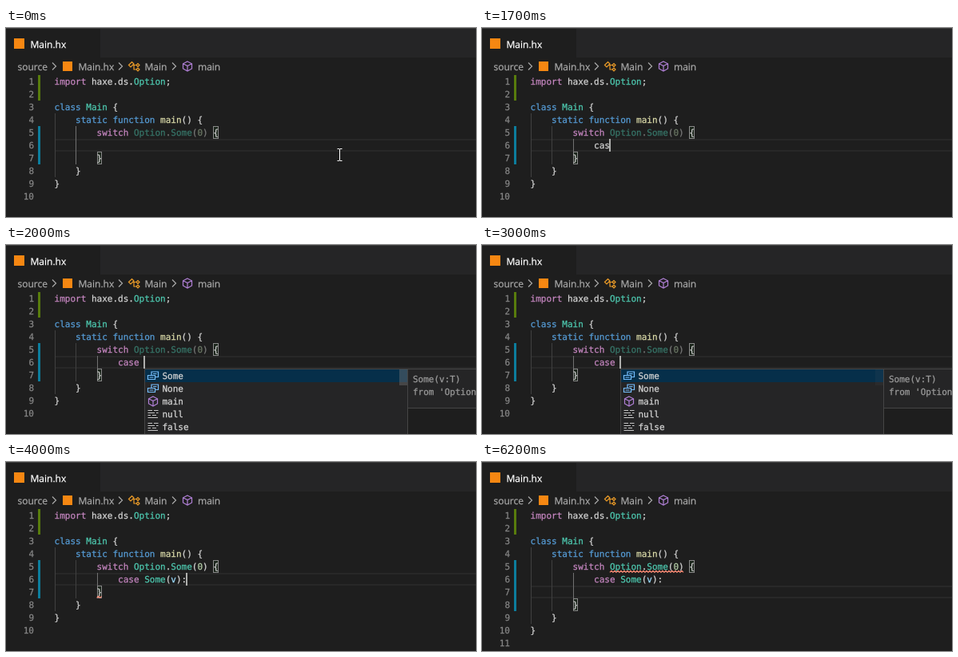
Write an HTML page that moves like this. It is 588 px wide and 237 px high and loops after 9.3 s.

```html
<!DOCTYPE html>
<html lang="en">
<head>
<meta charset="utf-8">
<title>Switch completion</title>
<style>
  html, body { margin: 0; width: 100%; height: 100%; overflow: hidden; background: #1e1e1e; }
  svg { display: block; width: 588px; height: 237px; }
  text { white-space: pre; text-rendering: geometricPrecision; stroke-width: .25px; }
  .mono { font: 11px "DejaVu Sans Mono", monospace; }
  .ui { font: 12px "Open Sans", sans-serif; }
</style>
</head>
<body>
<svg id="stage" viewBox="0 0 588 237"></svg>
<script>
const LOOP = 9300;
const CHAR = 6.6226, LEFT = 60.6, TOP = 59, LINE = 16;
const C = {
  text: '#d4d4d4', flow: '#c586c0', word: '#569cd6', type: '#4ec9b0', func: '#dcdcaa',
  name: '#9cdcfe', num: '#b5cea8', dim: '#858585', match: '#18a3ff', error: '#f48771',
  orange: '#ee9d28', blue: '#75beff', purple: '#b180d7', light: '#c5c5c5', crumb: '#a9a9a9',
  logo: '#f68712', panel: '#252526', edge: '#454545'
};

// Each step changes only the listed parts of the state.
const STEPS = [
  [0, { typed: '', caret: 0, mouse: [417.5, 159] }],
  [100, { mouse: [409, 153] }],
  [200, { mouse: [403.5, 150] }],
  [600, { mouse: [440, 149], caret: 1 }],
  [700, { mouse: [501.5, 146] }],
  [800, { mouse: null }],
  [1100, { caret: 0 }],
  [1500, { typed: 'c', caret: 1 }],
  [1700, { typed: 'cas' }],
  [1800, { typed: 'case', popup: 'types', scrollbar: 1 }],
  [1900, { typed: 'case ', popup: null }],
  [2000, { popup: 'values' }],
  [2300, { caret: 0 }],
  [2600, { scrollbar: .8 }],
  [2700, { scrollbar: .65 }],
  [2800, { scrollbar: .5, caret: 1 }],
  [2900, { scrollbar: .35 }],
  [3000, { scrollbar: .2 }],
  [3100, { typed: 'case Some(v):', popup: null, select: 1, column: 11 }],
  [3200, { hint: 1, live: 1, braceError: 1 }],
  [3600, { caret: 0 }],
  [3800, { hint: 0, select: 0, column: 13, caret: 1 }],
  [4300, { caret: 0, braceError: 0, switchError: 1 }],
  [4800, { newline: 1, caret: 1 }],
  [5300, { caret: 0 }],
  [5700, { caret: 1 }],
  [6200, { caret: 0 }]
];

const POPUPS = {
  types: {
    x: 167,
    rows: [
      ['struct', '*Case* - haxe.macro.Expr.Case'],
      ['enum', '*Case*First - js.lib.intl.Collator.CaseFirst'],
      ['class', '*Ca*nva*sE*lement - js.html.CanvasElement'],
      ['class', '*Ca*ch*eS*torage - js.html.CacheStorage'],
      ['enum', '*Ca*ch*eS*torageNamespace - js.html.CacheStorag…']
    ],
    info: ['typedef Case', 'Auto-import from'], doc: 'Represents a switch', height: 84
  },
  values: {
    x: 173,
    rows: [['member', 'Some'], ['member', 'None'], ['method', 'main'], ['keyword', 'null'], ['keyword', 'false']],
    info: ['Some(v:T)', "from 'Option'"], height: 50
  }
};

const colX = col => LEFT + col * CHAR;
const lineY = n => TOP + (n - 1) * LINE;
const esc = s => s.replace(/&/g, '&amp;').replace(/</g, '&lt;');
const ink = color => `fill="${color}" stroke="${color}"`;
const rect = (x, y, w, h, fill, extra = '') =>
  `<rect x="${x}" y="${y}" width="${w}" height="${h}" fill="${fill}" ${extra}/>`;
const box = (x, y, w, h, fill, stroke) => rect(x + .5, y + .5, w - 1, h - 1, fill, `stroke="${stroke}"`);
const path = (d, stroke, extra = '') => `<path d="${d}" fill="none" stroke="${stroke}" ${extra}/>`;
const text = (x, y, body, color, cls = 'mono', extra = '') =>
  `<text x="${x}" y="${y}" ${ink(color)} class="${cls}" ${extra}>${body}</text>`;
const span = (s, color, extra = '') => `<tspan ${ink(color)} ${extra}>${esc(s)}</tspan>`;

// Parts alternate between a palette key and the text it colours.
function code(line, col, ...parts) {
  let body = '';
  for (let i = 0; i < parts.length; i += 2) body += span(parts[i + 1], C[parts[i]]);
  return text(colX(col), lineY(line) + 12, body, C.text);
}

const ICONS = {
  method: [C.purple, 'M0-6L5.5-3.2V3L0 6L-5.5 3V-3.2ZM-5.5-3.2L0-.4L5.5-3.2M0-.4V6'],
  class: [C.orange, 'M-6.5-1.5L-2.5-5.5L0-3L-4 1ZM-2-1.5H3M0-1.5V4H3M3-1.5L5-3.5L7-1.5L5 .5ZM3 4L5 2L7 4L5 6Z'],
  enum: [C.orange, 'M-2 0V-5H6.5V1.5H3M0-2.7H4.5M-6.5 0H2.5V5.5H-6.5ZM-4.5 2H.5M-4.5 3.8H.5'],
  member: [C.blue, 'M-2-1V-5H6.5V1.5H3M0-2.5H4.5M-6.5-.5H2.5V4.5H-6.5ZM-4.5 2H.5'],
  keyword: [C.light, 'M-6.5-4.5H-1M1-4.5H6.5M-6.5-1.5H2M4-1.5H6.5M-6.5 1.5H-3M-1 1.5H4M-6.5 4.5H6'],
  struct: [C.light, 'M-6.5-5H6.5V-2H-6.5ZM-6.5 1H-2V5H-6.5ZM2 1H6.5V5H2Z']
};
const icon = (kind, x, y) =>
  path(ICONS[kind][1], ICONS[kind][0], `stroke-width="1.2" transform="translate(${x} ${y})"`);

function squiggle(x, bottom, width) {
  let d = `M${x} ${bottom - .7}`;
  for (let i = 0; i + 2 <= width; i += 2) d += `l2 ${i % 4 ? 2 : -2}`;
  return path(d, C.error, 'stroke-width="1.2"');
}

function header() {
  const chevron = x => path(`M${x} 43.5l4.5 4.5l-4.5 4.5`, C.crumb, 'stroke-width="1.2"');
  const crumb = (x, s) => text(x, 53, s, C.crumb, 'ui');
  return rect(118, 0, 470, 37, C.panel) + rect(0, 0, 588, 1, '#3c3c3c') +
    rect(10, 13, 13, 13, C.logo) + text(30.5, 25, 'Main.hx', '#fff', 'ui') +
    crumb(14.5, 'source') + chevron(58) +
    rect(71, 42, 12, 12, C.logo) + crumb(90.5, 'Main.hx') + chevron(141) +
    icon('class', 160, 48) + crumb(173.5, 'Main') + chevron(208) +
    icon('method', 227, 48) + crumb(240, 'main');
}

function gutter(s) {
  let out = rect(40, lineY(1), 3, 2 * LINE, '#587c0c') +
    rect(40, lineY(5), 3, (s.newline ? 4 : 3) * LINE, '#0c7d9d');
  for (let n = 1; n <= (s.newline ? 11 : 10); n++)
    out += text(35, lineY(n) + 12, n, C.dim, 'mono', 'text-anchor="end"');
  return out;
}

function guides(s) {
  const extra = s.newline ? 1 : 0;
  const guide = (col, line, count, active) =>
    rect(Math.round(colX(col)), lineY(line), 1, count * LINE, active ? '#707070' : '#404040');
  return guide(0, 4, 5 + extra) + guide(4, 5, 3 + extra, !s.typed) +
    (s.typed ? guide(8, 6, 1 + extra, true) : '');
}

function typedLine(s) {
  if (!s.typed.startsWith('case')) return code(6, 12, 'text', s.typed);
  if (s.typed.length < 6) return code(6, 12, 'flow', s.typed);
  return code(6, 12, 'flow', 'case ', 'type', 'Some', 'text', '(', 'name', 'v', 'text', '):');
}

function bracket(col, line) {
  const x = Math.round(colX(col));
  return box(x, lineY(line), Math.round(colX(col + 1)) - x, LINE, 'rgba(0,100,0,.1)', '#888');
}

function source(s) {
  const close = s.newline ? 8 : 7;
  const value = code(5, 15, 'type', 'Option', 'text', '.', 'type', 'Some', 'text', '(', 'num', '0', 'text', ')');
  return (s.select ? rect(colX(22), lineY(6), CHAR, LINE, '#264f78') + rect(226, lineY(6), 1, LINE, '#7c7c7c')
      : bracket(30, 5) + bracket(8, close)) +
    code(1, 0, 'flow', 'import ', 'text', 'haxe.ds.', 'type', 'Option', 'text', ';') +
    code(3, 0, 'word', 'class ', 'type', 'Main', 'text', ' {') +
    code(4, 4, 'word', 'static function ', 'func', 'main', 'text', '() {') +
    code(5, 8, 'flow', 'switch') + `<g opacity="${s.live ? 1 : .5}">${value}</g>` + code(5, 30, 'text', '{') +
    typedLine(s) +
    code(close, 8, 'text', '}') + code(close + 1, 4, 'text', '}') + code(close + 2, 0, 'text', '}') +
    (s.switchError ? squiggle(colX(15), lineY(6), 14 * CHAR) : '') +
    (s.braceError ? squiggle(colX(8), lineY(8), CHAR) : '');
}

function popup(s) {
  const { x, rows, info, doc, height } = POPUPS[s.popup];
  const right = x + 329;
  let out = box(x, 155, 330, 84, C.panel, C.edge) + rect(x + 1, 156, 328, LINE, '#062f4a');
  rows.forEach(([kind, label], i) => {
    const body = label.split('*').map((part, k) => span(part, k % 2 ? C.match : C.text)).join('');
    out += icon(kind, x + 11, 164 + i * LINE) + text(x + 22.5, 168 + i * LINE, body, C.text);
  });
  out += rect(right - 10, 156, 10, 20, '#797979', `opacity="${.4 * s.scrollbar}"`) +
    box(right, 155, 120, height, C.panel, C.edge);
  info.forEach((line, i) => out += text(right + 7, 172 + i * LINE, esc(line), '#9b9b9b'));
  return out + (doc ? text(right + 7, 220, doc, '#e0e0e0', 'ui') : '');
}

function hint() {
  const body = '(' + span('v:Int', C.text, 'font-weight="bold" text-decoration="underline"') +
    esc(') -> Option<Int>');
  return box(213, 112, 158, 29, C.panel, C.edge) + text(219.5, 130, body, C.text);
}

function caret(s) {
  const line = s.newline ? 7 : 6;
  const col = s.newline ? 16 : 12 + (s.column || s.typed.length);
  return rect(Math.round(colX(col)) - 1, lineY(line), 2, LINE, '#aeafad');
}

function pointer([x, y]) {
  return path(`M${x - 3} ${y - 7.5}h2.5l.5 .5l.5-.5h2.5M${x} ${y - 7}v14M${x - 3} ${y + 7.5}h2.5l.5-.5l.5 .5h2.5`, '#fff');
}

function draw(s) {
  const current = lineY(s.newline ? 7 : 6);
  return rect(0, 0, 588, 237, '#1e1e1e') + header() +
    rect(61, current, 527, 2, '#282828') + rect(61, current + 14, 527, 2, '#282828') +
    gutter(s) + guides(s) + source(s) +
    (s.caret ? caret(s) : '') + (s.popup ? popup(s) : '') + (s.hint ? hint() : '') +
    (s.mouse ? pointer(s.mouse) : '');
}

const stage = document.getElementById('stage');
const start = performance.now();
let shown = -1;

function tick() {
  const t = (performance.now() - start) % LOOP;
  const count = STEPS.filter(([at]) => at <= t).length;
  if (count !== shown) {
    shown = count;
    stage.innerHTML = draw(Object.assign({}, ...STEPS.slice(0, count).map(step => step[1])));
  }
  requestAnimationFrame(tick);
}
tick();
</script>
</body>
</html>
```
